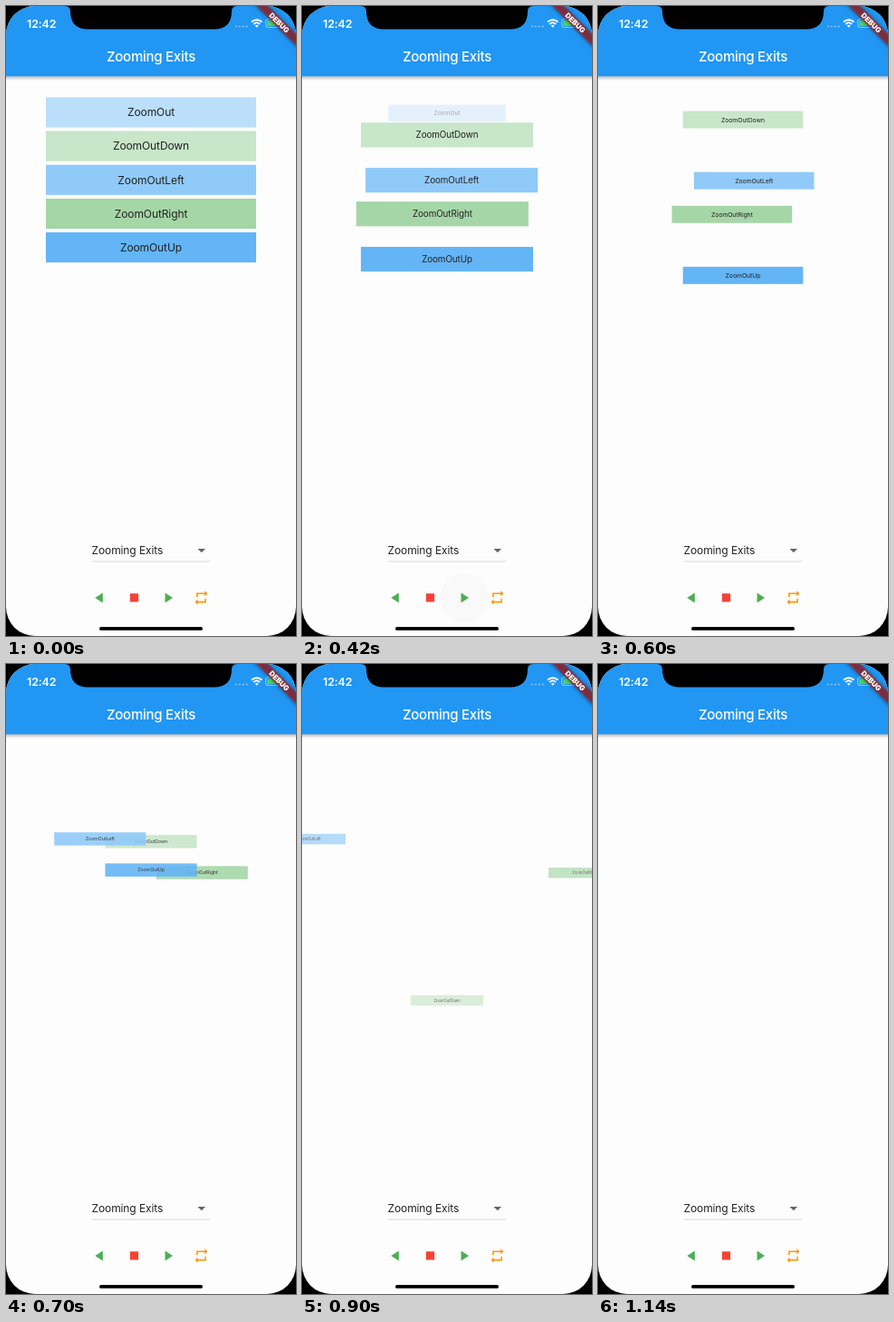
Recreate the animation shown at these times as an HTML page. Size 320x693 px, loop 1190 ms.

```html
<!DOCTYPE html>
<html lang="en">
<head>
<meta charset="utf-8">
<title>Zooming Exits</title>
<style>
  html, body { margin: 0; height: 100%; overflow: hidden; background: #000; }
  svg { display: block; width: 320px; height: 693px; }
  text { font: 12px Inter, "Open Sans", sans-serif; letter-spacing: -.1px; fill: #212121; }
  .mid { text-anchor: middle; }
  .title { font-size: 15px; font-weight: 500; letter-spacing: -.25px; fill: #fff; }
  .clock { font-size: 12.4px; font-weight: 600; fill: #fff; }
  .debug { font-size: 7.9px; font-weight: 900; letter-spacing: 0; fill: #fff; }
</style>
</head>
<body>
<svg viewBox="0 0 320 693">
  <defs>
    <clipPath id="screen"><rect width="320" height="693" rx="32"/></clipPath>
    <linearGradient id="shade" x2="0" y2="1">
      <stop stop-opacity=".26"/><stop offset="1" stop-opacity="0"/>
    </linearGradient>
    <filter id="blur" x="-20%" y="-100%" width="140%" height="300%">
      <feGaussianBlur stdDeviation="2"/>
    </filter>
  </defs>
  <g clip-path="url(#screen)">
    <rect width="320" height="693" fill="#fdfdfd"/>
    <g id="boxes"></g>

    <!-- app bar -->
    <rect y="77" width="320" height="5" fill="url(#shade)"/>
    <rect width="320" height="77.3" fill="#2196f3"/>
    <text class="mid title" x="160" y="61.3">Zooming Exits</text>
    <text class="clock" x="23" y="23.6">12:42</text>
    <path d="M254 22.5h12" stroke="#fff" stroke-opacity=".45" stroke-width="2.2" stroke-linecap="round" stroke-dasharray="0 3.9"/>
    <g fill="none" stroke="#fff" stroke-width="1.9">
      <path d="M271 17.6a8 8 0 0 1 11.4 0M273.2 20a5 5 0 0 1 7 0"/>
      <path d="M276.7 23.8l-1.9-2a2.7 2.7 0 0 1 3.8 0z" fill="#fff" stroke="none"/>
    </g>
    <rect x="286.5" y="14.5" width="18" height="9" rx="2.6" fill="none" stroke="#fff" stroke-opacity=".5"/>
    <rect x="288" y="16" width="15" height="6" rx="1.3" fill="#4cd964"/>

    <!-- corner banner -->
    <g transform="translate(320) rotate(45)">
      <rect x="-40" y="21.6" width="80" height="9.3" opacity=".5" filter="url(#blur)"/>
      <rect x="-40" y="21.6" width="80" height="9.3" fill="#b71c1c" fill-opacity=".63"/>
      <text class="mid debug" y="29.1">DEBUG</text>
    </g>

    <!-- controls -->
    <text x="94.5" y="603">Zooming Exits</text>
    <path d="M211.5 597h8.6l-4.3 4.3z" fill="#666"/>
    <path d="M95 611h130.5" stroke="#d4d4d4" stroke-width=".9"/>
    <circle id="ripple" cx="179" cy="651" r="0"/>
    <path transform="translate(113 641.7) scale(-.773 .773)" d="M8 5v14l11-7z" fill="#4caf50"/>
    <path transform="translate(132.2 641.7) scale(.773)" d="M6 6h12v12H6z" fill="#f44336"/>
    <path transform="translate(169.3 641.7) scale(.773)" d="M8 5v14l11-7z" fill="#4caf50"/>
    <path transform="translate(206.2 641.7) scale(.773)" d="M7 7h10v3l4-4-4-4v3H5v6h2V7zm10 10H7v-3l-4 4 4 4v-3h12v-6h-2v4z" fill="#ff9800"/>
    <rect x="103" y="683" width="114" height="3.8" rx="1.9"/>
    <path d="M65 0q6 0 6 6c0 13 7 19.5 19 19.5h140c12 0 19-6.500 19-19.500q0-6 6-6z"/>
  </g>
</svg>
<script>
const LOOP = 1190;
// The picture advances at these moments (ms).
const TICKS = [0, 120, 170, 220, 270, 320, 370, 420, 470, 520, 560, 600,
  650, 700, 760, 810, 860, 900, 940, 990, 1040, 1090, 1140];

// label, colour, exit direction
const ITEMS = [
  ['ZoomOut', '#bbdefb', 0, 0],
  ['ZoomOutDown', '#c8e6c9', 0, 1],
  ['ZoomOutLeft', '#90caf9', -1, 0],
  ['ZoomOutRight', '#a5d6a7', 1, 0],
  ['ZoomOutUp', '#64b5f6', 0, -1]
];

const boxes = document.getElementById('boxes');
const ripple = document.getElementById('ripple');
const clamp = v => Math.min(1, Math.max(0, v));

boxes.innerHTML = ITEMS.map(([label, color]) =>
  `<g><rect x="-116" y="-16.6" width="232" height="33.2" fill="${color}"/>
   <text class="mid" y="4.3">${label}</text></g>`).join('');

// Plain exit: shrink and fade in place.
function fadeOut(t) {
  const u = clamp((t - 225) / 332);
  const p = u * u * (3 - 2 * u);
  return { scale: 1 - .7 * p, alpha: 1 - p, x: 0, y: 0 };
}

// Directed exit: pull back while shrinking, then fly off and fade.
function flyOut(t) {
  if (t < 640) {
    const p = clamp((t - 158) / 500) ** 1.65;
    return { scale: 1 - .525 * p, alpha: 1, x: -14.9 * p, y: -36.7 * p };
  }
  const u = clamp((t - 640) / 500);
  const q = u - 1.21 * u * u + 1.06 * u ** 3;
  return {
    scale: .475 - .375 * q,
    alpha: 1 - q,
    x: 362 * q ** .72 - 14.9,
    y: 735 * q - 36.7
  };
}

function draw(t) {
  ITEMS.forEach(([, , dx, dy], i) => {
    const { scale, alpha, x, y } = dx || dy ? flyOut(t) : fadeOut(t);
    const cx = 160 + dx * x;
    const cy = 117 + 37.13 * i + dy * y + 2 * (1 - scale);
    const box = boxes.children[i];
    box.setAttribute('transform', `translate(${cx} ${cy}) scale(${scale})`);
    box.setAttribute('opacity', alpha);
  });
  ripple.setAttribute('r', t < 120 ? 0 : 27 * clamp((t - 70) / 150));
  ripple.setAttribute('opacity', .1 * clamp((445 - t) / 165));
}

function frame() {
  const now = performance.now() % LOOP;
  draw(TICKS.findLast(tick => tick <= now));
  requestAnimationFrame(frame);
}
frame();
</script>
</body>
</html>
```
